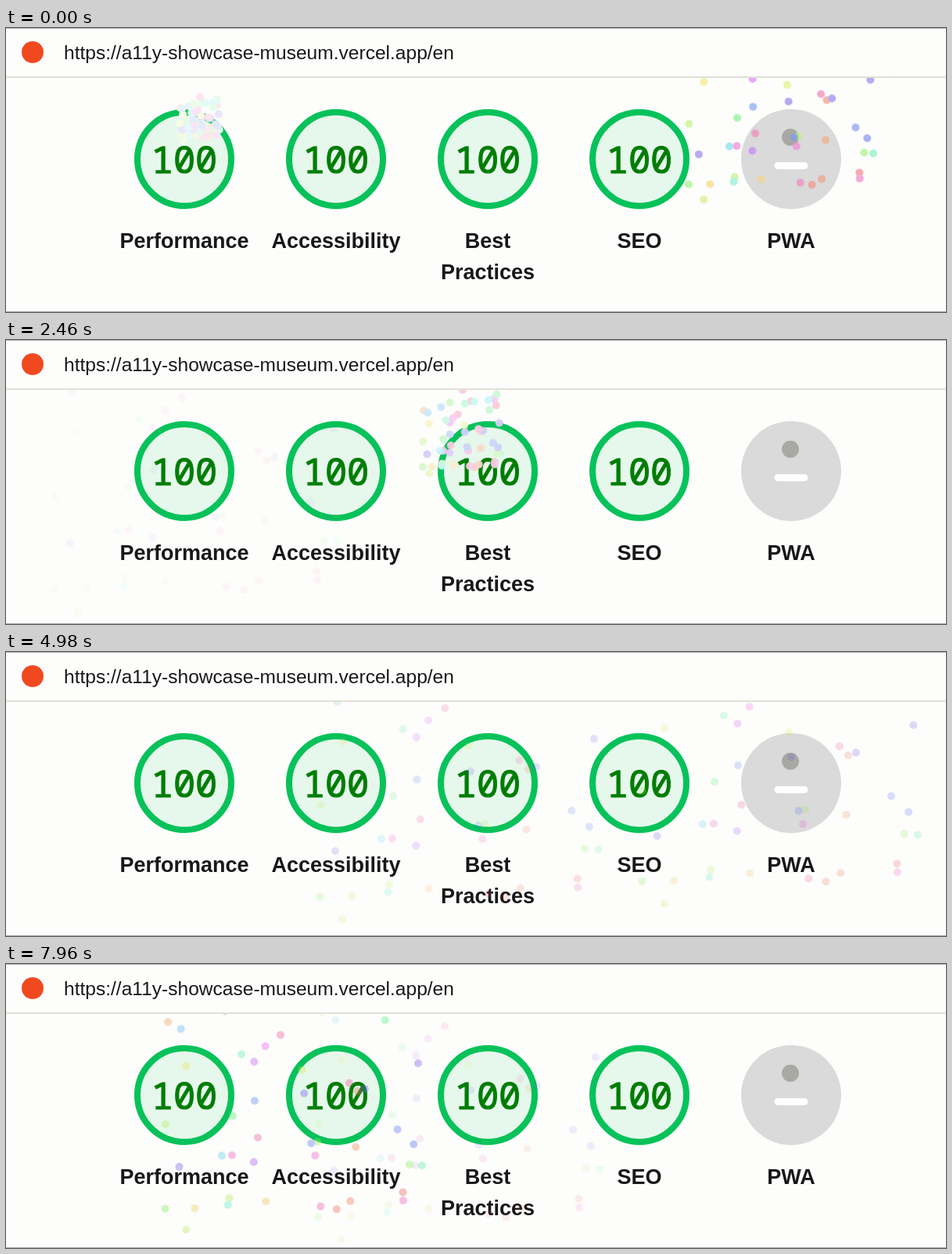
Write an HTML page that moves like this. It is 1202x364 px and loops after 8 s.

```html
<!DOCTYPE html>
<html lang="en">
<head>
<meta charset="utf-8">
<title>Audit scores</title>
<style>
  html, body { margin: 0; width: 100%; height: 100%; overflow: hidden; background: #fdfdfc; }
  #stage { position: relative; width: 1202px; height: 364px; overflow: hidden; }
  svg { position: absolute; inset: 0; }
  text { fill: #181818; font-family: "Liberation Sans", Arial, sans-serif; }
  .label { font-size: 27px; font-weight: bold; text-anchor: middle; }
  .score {
    font: 500 47px "Noto Sans Mono", monospace; text-anchor: middle;
    fill: #007d06; stroke: #007d06; stroke-width: 1.2;
  }
  .ring { fill: #e6f8eb; stroke: #07c25a; stroke-width: 8; }
  #sky { position: absolute; left: 0; top: 64px; width: 1202px; height: 299px; overflow: hidden; }
  #field { position: absolute; left: -5.7px; top: 26.1px; width: 1243px; height: 0; }
  .burst { position: absolute; width: 10px; height: 10px; border-radius: 5px; }
</style>
</head>
<body>
<div id="stage">
  <svg width="1202" height="364">
    <path d="M0 .5H1202M0 363.5H1202" stroke="#adadad"/>
    <path d="M0 63H1202" stroke="#e1e1d6" stroke-width="2"/>
    <circle cx="34" cy="31" r="14" fill="#f0491f"/>
    <text x="74" y="40" font-size="24.55">https://a11y-showcase-museum.vercel.app/en</text>
    <g id="gauges"></g>
    <circle cx="1004" cy="168" r="64" fill="#dadada"/>
    <circle cx="1003" cy="140" r="11" fill="#a9a9a3"/>
    <rect x="982.5" y="172" width="43" height="9" rx="4.5" fill="#fff"/>
    <text class="label" x="1004" y="282">PWA</text>
  </svg>
  <div id="sky"><div id="field"></div></div>
</div>
<script>
const LOOP = 8000;
const SPARK_COUNT = 51;

let seed = 7;
function random(min, max) {
  seed = seed * 16807 % 2147483647;
  return min + (max - min) * seed / 2147483647;
}

// Every burst throws the same sparks, from one white point to their final places.
const spread = Array.from({ length: SPARK_COUNT }, () =>
  `${random(-186, 194)}px ${random(-326, 67)}px hsl(${random(0, 360)} 80% 60%)`);
const gathered = spread.map(() => '0px 0px #fff');

function addBurst(duration, delay) {
  const burst = document.createElement('div');
  burst.className = 'burst';
  document.getElementById('field').append(burst);
  const play = (keyframes, easing, length = duration) => {
    const animation = burst.animate(keyframes,
      { duration: length, delay, easing, iterations: Infinity, fill: 'backwards' });
    animation.pause();
    return animation;
  };
  return [
    play({ boxShadow: [gathered.join(), spread.join()] }, 'ease-out'),
    play({ transform: ['translateY(0px)', 'translateY(160px)'], opacity: [1, 0] }, 'ease-in'),
    play({
      marginLeft: ['47%', '30%', '70%', '20%', '80%', '47%'],
      marginTop: ['4%', '7%', '6%', '3%', '3%', '4%'],
      easing: 'step-end',
    }, 'linear', 5 * duration),
  ];
}

document.getElementById('gauges').innerHTML =
  ['Performance', 'Accessibility', 'Best Practices', 'SEO'].map((name, i) => {
    const x = 228 + 194 * i;
    const lines = name.split(' ').map((word, row) =>
      `<text class="label" x="${x}" y="${282 + 40 * row}">${word}</text>`).join('');
    return `<circle class="ring" cx="${x}" cy="168" r="60"/>
      <text class="score" x="${x}" y="185.5">100</text>${lines}`;
  }).join('');

const animations = [...addBurst(1000, 0), ...addBurst(1250, 1250)];

// Slow motion: nine steps of 1/60 s, 40 ms apart, then a short hold, every 420 ms.
function fireworksTime(ms) {
  const elapsed = ms - 920;
  const run = Math.floor(elapsed / 420);
  const step = Math.min(8, Math.floor((elapsed - run * 420) / 40));
  return 13403 + (9 * run + step) * 1000 / 60;
}

const origin = performance.now();
function render() {
  const time = fireworksTime((performance.now() - origin) % LOOP);
  for (const animation of animations) animation.currentTime = time;
  requestAnimationFrame(render);
}
render();
</script>
</body>
</html>
```
